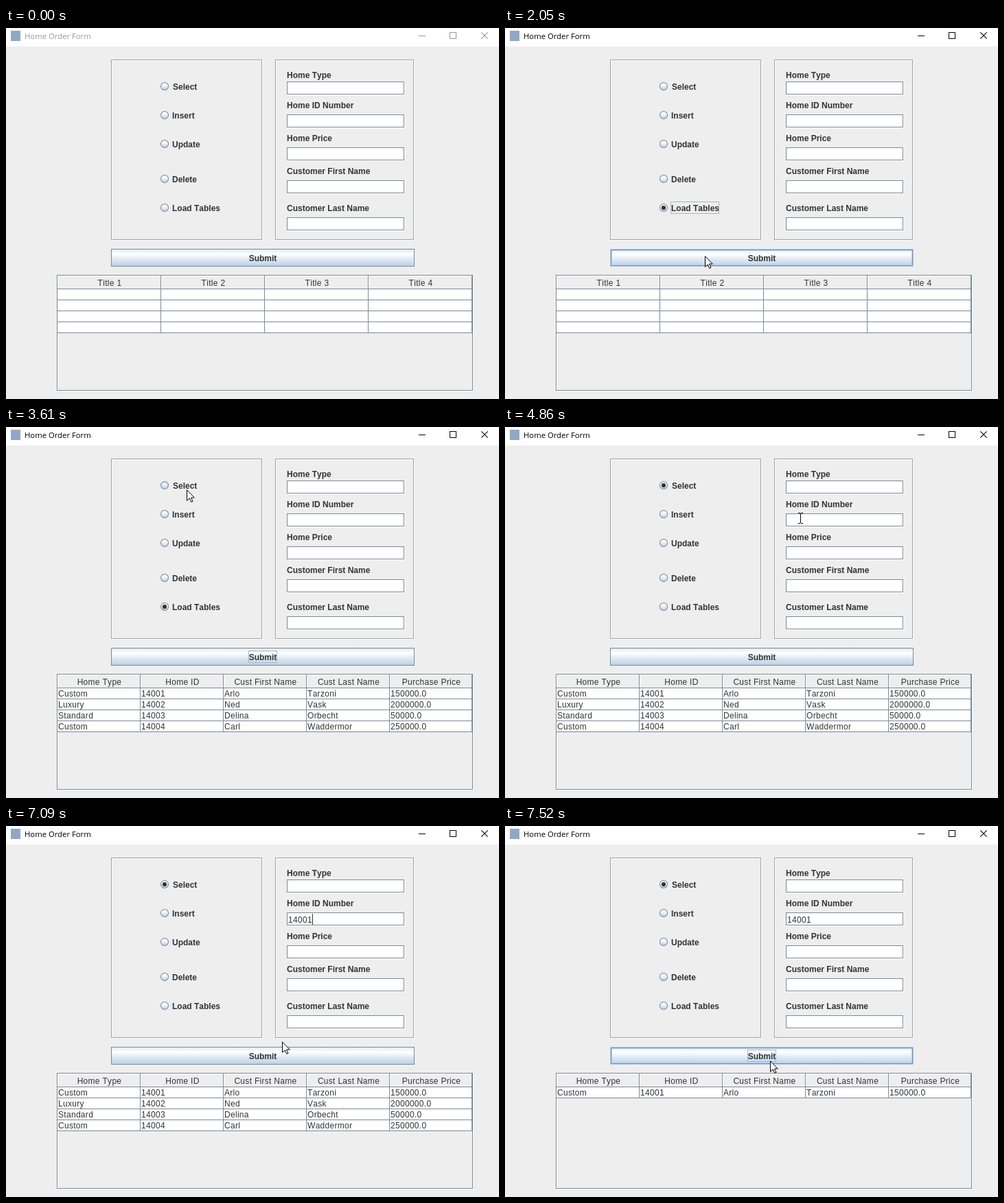
An HTML page for the animation above (8 s loop, 718 px wide and 541 px high).

```html
<!DOCTYPE html>
<html lang="en">
<head>
<meta charset="utf-8">
<title>Home Order Form</title>
<style>
  html, body { margin: 0; width: 100%; height: 100%; overflow: hidden; background: #eee; }
  svg { display: block; width: 100%; height: 100%; }
  text { font: 12px "Liberation Sans", Arial, sans-serif; fill: #333; font-kerning: none; letter-spacing: .3px; }
  .bold { font-weight: bold; letter-spacing: 0; }
  .caption { font: 11.3px "Open Sans", "Noto Sans", sans-serif; letter-spacing: 0; }
  .mid { text-anchor: middle; }
  rect, .line { shape-rendering: crispEdges; }
</style>
</head>
<body>
<svg viewBox="0 0 718 541" xmlns="http://www.w3.org/2000/svg">
  <defs>
    <linearGradient id="ocean" x2="0" y2="1">
      <stop offset="0" stop-color="#dde8f3"/>
      <stop offset=".3" stop-color="#fff"/>
      <stop offset=".6" stop-color="#dde8f3"/>
      <stop offset="1" stop-color="#b8cfe5"/>
    </linearGradient>
  </defs>
  <g id="base"></g>
  <g id="live"></g>
</svg>
<script>
const LOOP = 8000;
const EDGE = '#7a8a99', PALE = '#b8cfe5', FOCUS = '#a3b8cc';

const radios = [
  { name: 'Select', x: 243, y: 85, end: 280 },
  { name: 'Insert', x: 242, y: 127, end: 277 },
  { name: 'Update', x: 242, y: 169, end: 284 },
  { name: 'Delete', x: 242, y: 220, end: 280 },
  { name: 'Load Tables', x: 242, y: 262, end: 313 }
];

const fields = [
  ['Home Type', 78, 73],
  ['Home ID Number', 126, 117],
  ['Home Price', 174, 165],
  ['Customer First Name', 222, 213],
  ['Customer Last Name', 276, 267]
];

const emptyTable = {
  heads: ['Title 1', 'Title 2', 'Title 3', 'Title 4'],
  rows: [[], [], [], []]
};
const homes = {
  heads: ['Home Type', 'Home ID', 'Cust First Name', 'Cust Last Name', 'Purchase Price'],
  rows: [
    ['Custom', '14001', 'Arlo', 'Tarzoni', '150000.0'],
    ['Luxury', '14002', 'Ned', 'Vask', '2000000.0'],
    ['Standard', '14003', 'Delina', 'Orbecht', '50000.0'],
    ['Custom', '14004', 'Carl', 'Waddermor', '250000.0']
  ]
};
const oneHome = { heads: homes.heads, rows: homes.rows.slice(0, 1) };

// Pointer glides: start, end, steps, target x, target y
const glides = [
  [230, 290, 2, 425, 297],
  [610, 850, 5, 298, 253],
  [1050, 1160, 3, 287, 261],
  [1670, 1790, 3, 288, 347],
  [1980, 2050, 2, 291, 332],
  [3100, 3610, 9, 263, 91],
  [3920, 4000, 2, 399, 112],
  [4250, 4380, 3, 432, 133],
  [4860, 4860, 1, 430, 133],
  [6920, 7090, 4, 402, 314],
  [7160, 7270, 3, 386, 342]
];

// Values that switch at set times: [from, value]
const selection = [[0, ''], [1360, 'Load Tables'], [3830, 'Select']];
const pressing = [[0, ''], [1300, 'Load Tables'], [1360, ''], [2170, 'Submit'], [2290, ''],
  [3750, 'Select'], [3830, ''], [7470, 'Submit'], [7520, '']];
const focusing = [[0, ''], [1300, 'Load Tables'], [2170, 'Submit'], [3750, 'Select'],
  [4440, 'field'], [7470, 'Submit']];
const tables = [[0, emptyTable], [2350, homes], [7520, oneHome]];
const typed = [[0, ''], [5430, '1'], [5600, '14'], [5800, '140'], [5930, '1400'], [6050, '14001']];
const caretOn = [[0, 0], [4440, 1], [4860, 0], [5360, 1], [6540, 0], [7030, 1], [7470, 0]];

const at = (track, t) => track.filter(s => s[0] <= t).pop()[1];
const ease = p => p * p * (3 - 2 * p);
const inside = (p, x0, y0, x1, y1) => p && p.x >= x0 && p.x < x1 && p.y >= y0 && p.y < y1;

const fill = (x, y, w, h, color) => `<rect x="${x}" y="${y}" width="${w}" height="${h}" fill="${color}"/>`;
const frame = (x, y, w, h, color) =>
  `<rect x="${x + .5}" y="${y + .5}" width="${w - 1}" height="${h - 1}" fill="none" stroke="${color}"/>`;
const path = (d, color, more = '') => `<path d="${d}" fill="none" stroke="${color}" ${more}/>`;
const label = (s, x, y, cls = '', more = '') => `<text x="${x}" y="${y}" class="${cls}" ${more}>${s}</text>`;

function panel(x, y, w, h) {
  return frame(x + 1, y + 1, w - 1, h - 1, '#fff') + frame(x, y, w - 1, h - 1, '#a0a0a0');
}

function field([name, y, base]) {
  return label(name, 409, base, 'bold') + fill(409, y, 172, 20, '#fff') + frame(409, y, 171, 19, EDGE);
}

function pointerAt(t) {
  if (t < glides[0][0]) return null;
  let x = 563, y = 445;
  for (const [start, end, n, tx, ty] of glides) {
    if (t < start) break;
    const gap = n > 1 ? (end - start) / (n - 1) : 1;
    const step = Math.min(n, Math.floor((t - start) / gap + 1e-6) + 1);
    const p = ease(step / n);
    x = Math.round(x + (tx - x) * p);
    y = Math.round(y + (ty - y) * p);
  }
  return { x, y };
}

function windowBar(active) {
  const ink = active ? '#000' : '#999';
  return label('Home Order Form', 27, 16, 'caption', `style="fill:${ink}"`) +
    fill(601, 11, 10, 1, ink) + frame(646, 6, 10, 10, ink) +
    path('M692.3 6.3l9.4 9.4M701.7 6.3l-9.4 9.4', ink, 'stroke-width="1.1"');
}

function radio(r, t, p) {
  const pressed = at(pressing, t) === r.name;
  const hover = inside(p, 221, r.y - 12, r.end + 4, r.y + 13);
  const dot = (size, more) => `<circle cx="231" cy="${r.y}" r="${size}" ${more}/>`;
  let s = dot(5.5, `fill="${pressed ? PALE : 'url(#ocean)'}" stroke="${EDGE}" stroke-width="1.1"`);
  if (hover && !pressed) s += dot(4.3, `fill="none" stroke="${PALE}" stroke-width="1.4"`);
  if (at(selection, t) === r.name) s += dot(3.1, 'fill="#333"');
  if (at(focusing, t) === r.name) s += frame(241, r.y - 9, r.end - 242, 18, FOCUS);
  return s + label(r.name, r.x, r.y + 5, 'bold');
}

function submit(t, p) {
  const pressed = at(pressing, t) === 'Submit';
  let s = fill(153, 322, 442, 26, pressed ? PALE : 'url(#ocean)') + frame(153, 322, 442, 26, EDGE);
  if (pressed) s += fill(153, 322, 442, 2, EDGE) + fill(153, 322, 2, 26, EDGE);
  else if (inside(p, 153, 322, 595, 348)) {
    s += frame(153, 322, 442, 26, PALE) + frame(155, 324, 438, 22, PALE) + frame(154, 323, 440, 24, '#7090b8');
  }
  if (at(focusing, t) === 'Submit') s += frame(353, 326, 42, 18, FOCUS);
  return s + label('Submit', 374, 340, 'bold mid');
}

function table({ heads, rows }) {
  const width = Math.ceil(604 / heads.length);
  const bottom = 381 + 16 * rows.length;
  let s = fill(75, 381, 604, bottom - 381, '#fff');
  heads.forEach((head, i) => {
    const x = 75 + i * width;
    const w = Math.min(width, 679 - x);
    s += fill(x, 361, w, 1, '#fff') + fill(x, 361, 1, 19, '#fff') +
      fill(x, 380, w, 1, EDGE) + fill(x + w - 1, 361, 1, bottom - 361, EDGE) +
      label(head, x + w / 2 + .5, 376, 'mid');
  });
  rows.forEach((row, j) => {
    s += fill(75, 396 + 16 * j, 604, 1, EDGE);
    row.forEach((cell, i) => s += label(cell, 76 + i * width, 393 + 16 * j));
  });
  return s;
}

function pointer(p) {
  if (!p) return '';
  const beam = fields.some(([, y]) => inside(p, 409, y, 581, y + 20));
  const shape = beam
    ? path('M-3 -7.5h3M1 -7.5h3M.5 -7v14M-3 7.5h3M1 7.5h3', '#000', 'class="line"')
    : '<path d="M.5 .8V16.3L4.2 12.9L6.8 18.4L9 17.4L6.5 12H11.3Z" fill="#fff" stroke="#000"/>';
  return `<g transform="translate(${p.x} ${p.y})">${shape}</g>`;
}

function scene(t) {
  const p = pointerAt(t);
  return windowBar(t >= 1300) +
    radios.map(r => radio(r, t, p)).join('') +
    submit(t, p) + table(at(tables, t)) +
    label(at(typed, t), 411, 141) +
    (at(caretOn, t) ? fill(411 + 7 * at(typed, t).length, 128, 1, 16, '#333') : '') +
    pointer(p);
}

const live = document.getElementById('live');
document.getElementById('base').innerHTML =
  fill(0, 0, 718, 541, '#eee') + fill(0, 0, 718, 27, '#fff') + fill(7, 4, 14, 15, '#8fa9c4') +
  panel(153, 46, 221, 264) + panel(392, 46, 203, 264) +
  fields.map(field).join('') +
  frame(75, 361, 606, 169, '#fff') + frame(74, 360, 606, 169, EDGE);

let shown = '';
const began = performance.now();
function draw() {
  const next = scene((performance.now() - began) % LOOP);
  if (next !== shown) live.innerHTML = shown = next;
  requestAnimationFrame(draw);
}
draw();
</script>
</body>
</html>
```
